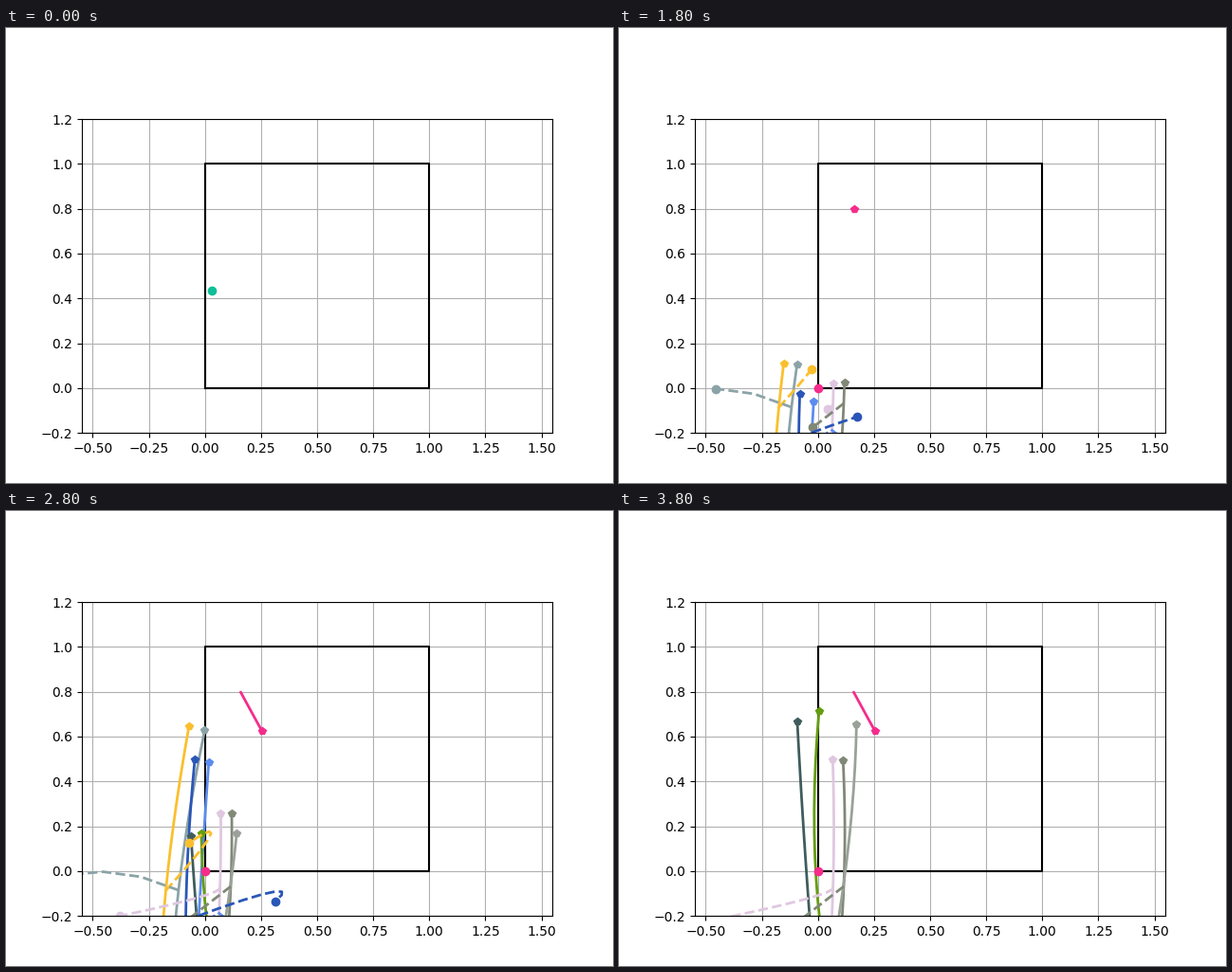
Recreate the animation shown at these times as a matplotlib script. Size 640 by 480 pixels, loop 4000 ms.

```python
import numpy as np
import matplotlib.pyplot as plt
from matplotlib.animation import FuncAnimation

FRAMES, STEP = 20, 200
LAST = FRAMES - 1
SEEN = 7  # last observed step; forecasts branch off here
PINK = "#f52c8c"

# Walkers: colour, first and last step, then start, halfway and end points.
WALKS = {
    "teal": ("#0fbf97", 0, 4, (.03, .435), (.028, .655), (.055, .89)),
    "amber": ("#fbbf2d", 5, 16, (-.19, -.275), (-.132, .265), (-.028, .875)),
    "mist": ("#8ba3a7", 5, 16, (-.135, -.265), (-.07, .255), (.048, .855)),
    "lilac": ("#dfc7e0", 4, LAST, (.062, -.21), (.071, .14), (.066, .5)),
    "olive": ("#808876", 4, LAST, (.108, -.205), (.12, .14), (.112, .495)),
    "blue": ("#2a56b8", 6, 17, (-.086, -.315), (-.067, .23), (-.008, .832)),
    "sky": ("#5b8bee", 7, 17, (-.031, -.27), (.002, .265), (.042, .82)),
    "slate": ("#3f5c5c", 9, LAST, (-.026, -.345), (-.062, .157), (-.092, .667)),
    "green": ("#649d10", 9, LAST, (.022, -.325), (-.016, .168), (.005, .713)),
    "grey": ("#9aa199", 9, LAST, (.07, -.34), (.142, .168), (.172, .655)),
}

# Forecasts: halfway and end points; they start at the walker's observed position.
FORECASTS = {
    "amber": ((.026, .175), (-.25, -.01)),
    "mist": ((-.87, -.11), (-1.61, -.89)),
    "lilac": ((-.253, -.173), (-1.31, -.38)),
    "olive": ((-.3, -.39), (-.71, -.71)),
    "blue": ((.343, -.092), (.05, -.3)),
    "sky": ((.4, -1.35), (.8, -6.2)),
}


def curve(first, last, start, mid, end):
    """Quadratic path through three points, one position per step, then at rest."""
    u = np.clip((np.arange(first, FRAMES) - first) / (last - first), 0, 1)[:, None]
    a, b, c = map(np.array, (start, mid, end))
    return a * (1 - u) * (1 - 2 * u) + 4 * b * u * (1 - u) + c * u * (2 * u - 1)


fig = plt.figure(figsize=(6.4, 4.8), dpi=100)
ax = fig.add_axes([.125, .11, .775, .69])
half = .7 * 496 / 331.2  # equal scale on both axes
ax.set(xlim=(.5 - half, .5 + half), ylim=(-.2, 1.2))
ax.set_xticks(np.arange(-.5, 1.51, .25))
ax.grid(True)
ax.plot([0, 1, 1, 0, 0], [0, 0, 1, 1, 0], color="black", lw=1.5)

tracks = []


def add_track(color, first, last, path, dashed=False):
    line, = ax.plot([], [], "--" if dashed else "-", color=color, lw=2,
                    marker="o", ms=6, markevery=[-1], visible=False)
    tracks.append((line, first, last, path, dashed))


paths = {}
for name, (color, first, last, *points) in WALKS.items():
    paths[name] = curve(first, last, *points)
    add_track(color, first, last, paths[name])
add_track(PINK, 9, LAST, curve(9, 14, (.16, .797), (.231, .667), (.255, .624)))

for name, points in FORECASTS.items():
    color, first, last = WALKS[name][:3]
    start = paths[name][SEEN - first]
    add_track(color, SEEN, last, curve(SEEN, last, start, *points), dashed=True)
add_track(PINK, 9, LAST, np.zeros((FRAMES - 9, 2)), dashed=True)


def update(i):
    for line, first, last, path, dashed in tracks:
        shown = first <= i <= last and not (dashed and i <= SEEN)
        line.set_visible(shown)
        if shown:
            line.set_data(*path[:i - first + 1].T)
            line.set_marker("o" if dashed or i <= SEEN else "p")
    return [track[0] for track in tracks]


anim = FuncAnimation(fig, update, frames=FRAMES, init_func=lambda: update(0),
                     interval=STEP, repeat=True, repeat_delay=0)
plt.show()
```
